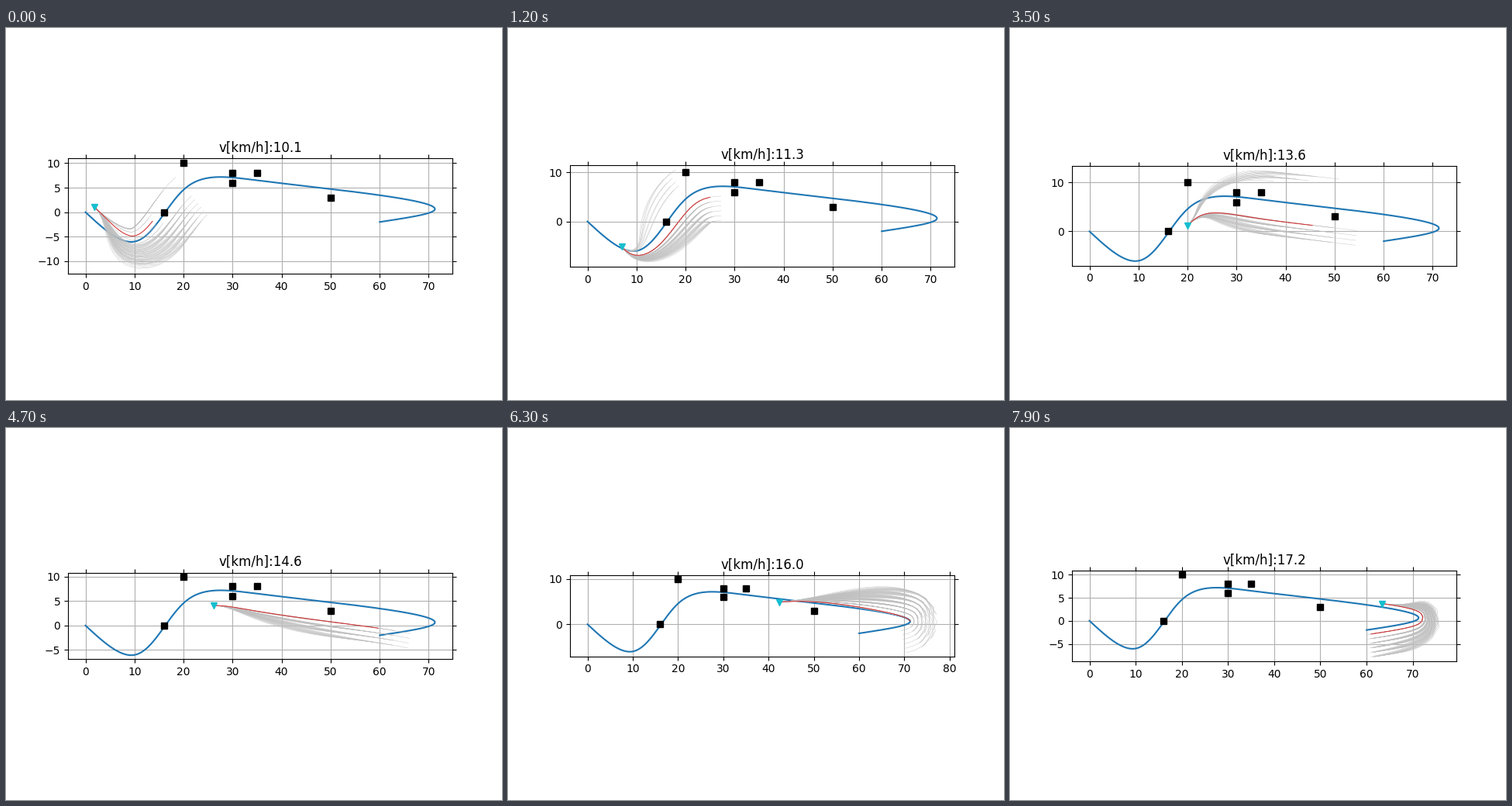
A matplotlib script that plays this animation: 640 by 480 pixels, repeating every 8000 ms.

```python
import matplotlib.pyplot as plt
import numpy as np
from matplotlib.animation import FuncAnimation
from matplotlib.collections import LineCollection

FRAMES, INTERVAL = 80, 100

# Planner settings (metres, seconds)
MAX_SPEED = 50.0 / 3.6
MAX_ACCEL = 2.0
MAX_CURVATURE = 1.0
ROAD_W, ROAD_STEP = 7.0, 1.0
DT, MIN_T, MAX_T = 0.2, 4.0, 5.0
TARGET_SPEED = 30.0 / 3.6
SPEED_STEP = 5.0 / 3.6
RADIUS = 2.0
K_J, K_T, K_D = 0.1, 0.1, 1.0

WAYPOINTS = np.array([(0, 0), (10, -6), (20.5, 5), (35, 6.5), (70.5, 0), (60, -2)], float)
OBSTACLES = np.array([(20, 10), (30, 6), (30, 8), (35, 8), (50, 3), (16, 0)], float)


class Spline:
    """Natural cubic spline through points, parametrised by chord length."""

    def __init__(self, pts):
        self.pts = pts
        self.h = h = np.hypot(*np.diff(pts, axis=0).T)
        self.s = np.concatenate([[0], np.cumsum(h)])
        n = len(pts)
        a, rhs = np.eye(n), np.zeros((n, 2))
        slope = np.diff(pts, axis=0) / h[:, None]
        for i in range(1, n - 1):
            a[i, i - 1:i + 2] = h[i - 1], 2 * (h[i - 1] + h[i]), h[i]
            rhs[i] = 3 * (slope[i] - slope[i - 1])
        self.c = c = np.linalg.solve(a, rhs)
        self.d = np.diff(c, axis=0) / (3 * h[:, None])
        self.b = slope - h[:, None] * (c[1:] + 2 * c[:-1]) / 3

    def frame(self, s):
        """Position and left-hand unit normal at each s."""
        i = np.clip(np.searchsorted(self.s, s, side="right") - 1, 0, len(self.h) - 1)
        t = (s - self.s[i])[:, None]
        b, c, d = self.b[i], self.c[i], self.d[i]
        pos = self.pts[i] + t * (b + t * (c + t * d))
        tan = b + t * (2 * c + 3 * t * d)
        tan /= np.hypot(*tan.T)[:, None]
        return pos, np.column_stack([-tan[:, 1], tan[:, 0]])


def derivatives(coef, t):
    """Value and first three derivatives of a polynomial, lowest power first."""
    out = []
    for _ in range(4):
        out.append(np.polyval(coef[::-1], t))
        coef = coef[1:] * np.arange(1, len(coef))
    return out


def quartic(x, v, v_end, T):
    k = (v_end - v) / T**2
    return np.array([x, v, 0, k, -k / (2 * T)])


def quintic(x, v, a, x_end, T):
    m = np.array([[T**3, T**4, T**5],
                  [3 * T**2, 4 * T**3, 5 * T**4],
                  [6 * T, 12 * T**2, 20 * T**3]])
    rhs = [x_end - x - v * T - a * T**2 / 2, -v - a * T, -a]
    return np.concatenate([[x, v, a / 2], np.linalg.solve(m, rhs)])


def is_free(xy):
    step = np.diff(xy, axis=0)
    yaw = np.arctan2(step[:, 1], step[:, 0])
    curvature = np.diff(yaw) / np.hypot(*step.T)[:-1]
    if np.any(np.abs(curvature) > MAX_CURVATURE):
        return False
    gap = xy[:, None] - OBSTACLES
    return not np.any((gap**2).sum(axis=2) <= RADIUS**2)


def candidates(road, s0, speed, lat):
    """All drivable paths as (cost, points, next state)."""
    targets = np.arange(TARGET_SPEED - SPEED_STEP, TARGET_SPEED + SPEED_STEP, SPEED_STEP)
    offsets = np.arange(-ROAD_W, ROAD_W, ROAD_STEP)
    free, blocked = [], []
    for T in np.arange(MIN_T, MAX_T, DT):
        t = np.arange(0.0, T, DT)
        lats = [derivatives(quintic(*lat, d, T), t) for d in offsets]
        for v_end in targets:
            s, v, a, j = derivatives(quartic(s0, speed, v_end, T), t)
            if np.any(v > MAX_SPEED) or np.any(np.abs(a) > MAX_ACCEL):
                continue
            on_road = s <= road.s[-1]
            pos, normal = road.frame(s[on_road])
            lon_cost = K_J * np.sum(j**2) + K_T * T + K_D * (TARGET_SPEED - v[-1])**2
            for d, dv, da, dj in lats:
                xy = pos + normal * d[on_road][:, None]
                cost = lon_cost + K_J * np.sum(dj**2) + K_T * T + K_D * d[-1]**2
                path = cost, xy, (s[1], v[1], (d[1], dv[1], da[1]))
                (free if is_free(xy) else blocked).append(path)
    return free or blocked


def drive(road):
    state = 0.0, 10.0 / 3.6, (2.0, 0.0, 0.0)
    plans = []
    for _ in range(FRAMES):
        paths = candidates(road, *state)
        _, best, state = min(paths, key=lambda p: p[0])
        plans.append(([p[1][1:] for p in paths], best[1:], state[1] * 3.6))
    return plans


road = Spline(WAYPOINTS)
course, _ = road.frame(np.arange(0, road.s[-1], 0.1))
plans = drive(road)

fig, ax = plt.subplots(figsize=(6.4, 4.8), dpi=100)
ax.set_aspect("equal", adjustable="box")
ax.tick_params(top=True, right=True)
ax.grid(True)
ax.plot(*course.T, color="#1f77b4")
ax.plot(*OBSTACLES.T, "sk")
fan = ax.add_collection(LineCollection([], colors="0.75", linewidths=0.3), autolim=False)
choice, = ax.plot([], [], color="#d62728", lw=0.7)
car, = ax.plot([], [], "v", color="#17becf")
title = ax.set_title("", y=1.0)


def update(i):
    paths, best, kmh = plans[i]
    fan.set_segments(paths)
    choice.set_data(*best.T)
    car.set_data(*best[:1].T)
    title.set_text("v[km/h]:" + str(kmh)[:4])
    pts = np.vstack([course, OBSTACLES, *paths])
    low, high = pts.min(axis=0), pts.max(axis=0)
    pad = 0.05 * (high - low)
    ax.set_xlim(low[0] - pad[0], high[0] + pad[0])
    ax.set_ylim(low[1] - pad[1], high[1] + pad[1])
    return fan, choice, car, title


anim = FuncAnimation(fig, update, frames=FRAMES, interval=INTERVAL, repeat=True, repeat_delay=0)
plt.show()
```
